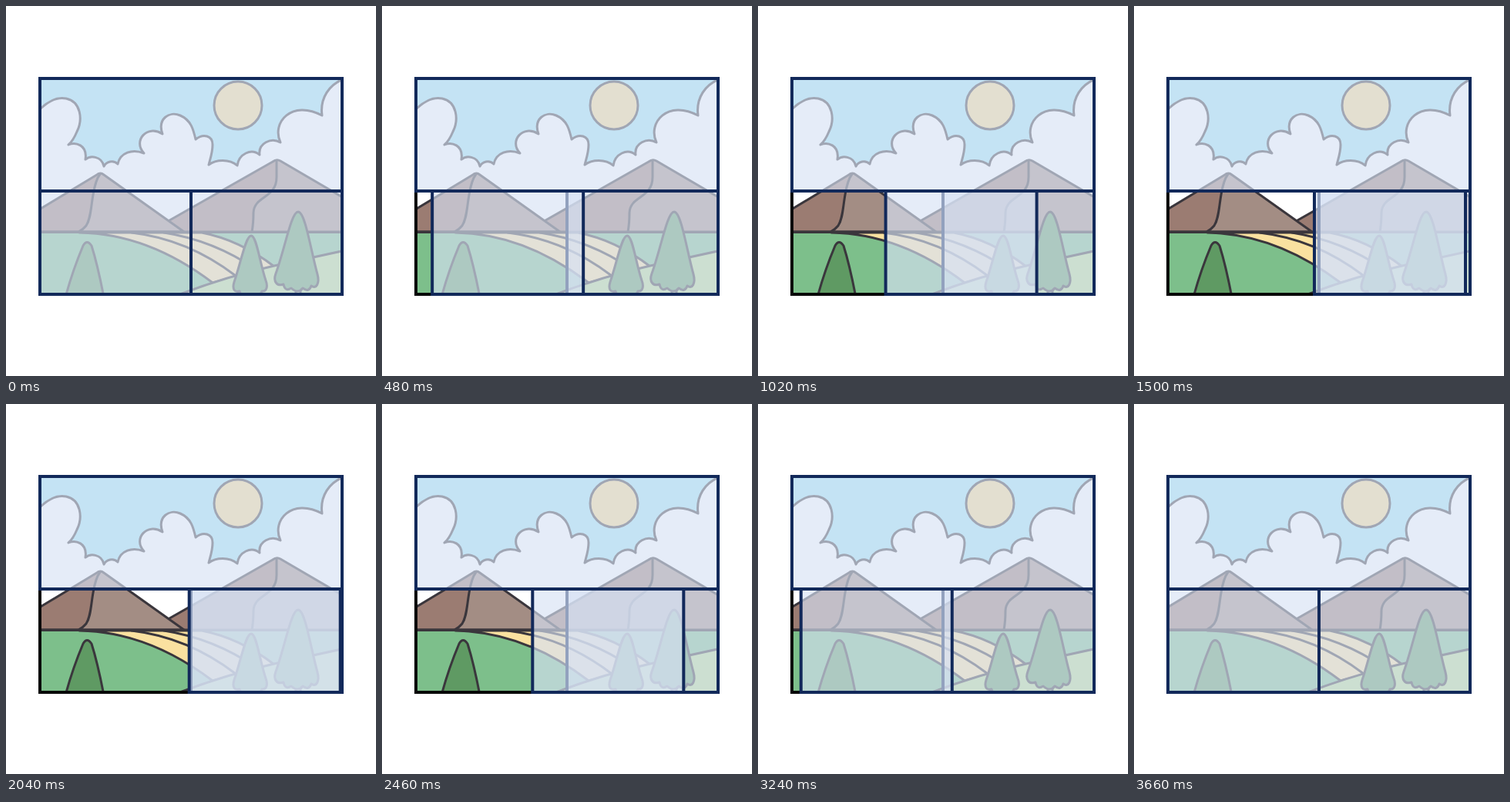
These frames come from a looping animation (480x480 px, 3.72 s). An HTML page:

```html
<!DOCTYPE html>
<html lang="en">
<head>
<meta charset="utf-8">
<title>Sliding window</title>
<style>
html, body { margin: 0; width: 100%; height: 100%; overflow: hidden; background: #fff; }
svg { display: block; width: 100vw; height: 100vh; }
.scene { stroke: #3a363c; stroke-width: 3; stroke-linejoin: round; stroke-linecap: round; }
.line { fill: none; }
.pane { fill: rgba(216, 226, 245, .65); stroke: #12295a; stroke-width: 4; }
.tree { fill: #5f9a63; }
</style>
</head>
<body>
<svg viewBox="0 0 480 480">
  <defs>
    <clipPath id="view"><rect x="44" y="94" width="392" height="280"/></clipPath>
    <clipPath id="leftPeak"><path id="peakA" d="M30 272L117 219.5Q122 215 127 219L231 293H30Z"/></clipPath>
    <clipPath id="rightPeak"><path id="peakB" d="M184 294L346 202Q351 198 356 201L450 256V294Z"/></clipPath>
  </defs>

  <g class="scene" clip-path="url(#view)">
    <rect x="40" y="90" width="400" height="290" fill="#a0e6f4"/>
    <circle cx="301" cy="129" r="31" fill="#fbdc8c"/>
    <path fill="#fff" d="M40 138C52 125 64 117 78 120C97 124 100 147 92 163Q87 175 81 180
      C90 176 106 180 103 199C109 194 124 194 127 208C130 202 139 199 145 205
      C148 190 164 185 179 191C164 175 183 153 203 166C196 146 212 136 226 142
      C240 148 243 160 246 173C256 165 268 168 268 180C268 190 265 198 263 206
      C272 199 290 198 300 207C302 192 318 184 329 193C327 178 344 170 356 177
      C344 151 371 121 410 142C407 120 419 101 440 94V300H40Z"/>

    <g clip-path="url(#rightPeak)" stroke="none">
      <rect x="180" y="190" width="270" height="110" fill="#a38d84"/>
      <path fill="#9b7c72" d="M180 300V190H351V226C349 250 322 244 320 268V300Z"/>
    </g>
    <path class="line" d="M351 201V222C351 250 322 246 321 268Q321 282 319 293"/>
    <use href="#peakB" class="line"/>

    <g clip-path="url(#leftPeak)" stroke="none">
      <rect x="30" y="210" width="210" height="90" fill="#a38d84"/>
      <path fill="#9b7c72" d="M30 300V210H122V218Q116 226 113 245C110 262 110 276 104 285Q100 290 94 293V300Z"/>
    </g>
    <path class="line" d="M122 218Q116 226 113 245C110 262 110 276 104 285Q100 290 94 293"/>
    <use href="#peakA" class="line"/>

    <rect x="38" y="293" width="404" height="90" fill="#7dbf8b"/>
    <path fill="#fae1a0" d="M95 294C165 295 222 324 268 359L348 338C322 318 290 301 254 294Z"/>
    <path class="line" d="M163 294C214 300 260 321 298 350M205 294C250 301 290 318 325 342M38 293.5H442"/>
    <path fill="#b8dc91" d="M220 376C262 360 303 347 348 337L440 317V380H220Z"/>

    <path class="tree" d="M77 378C84 352 92 330 100 311Q105 302 111 311C117 330 122 352 127 378Z"/>
    <path class="tree" d="M318 298C311 298 305 332 296 358C293 368 297 372 303 370
      Q305 378 312 374Q318 380 324 374Q330 376 332 370C338 371 340 364 337 356C329 332 325 298 318 298Z"/>
    <path class="line" d="M376 366V380M382 366V380"/>
    <path class="tree" d="M379 267C370 267 362 314 350 347C346 358 352 364 360 361
      Q362 371 370 366Q379 374 385 366Q393 372 396 363C403 368 407 359 404 348C395 315 388 267 379 267Z"/>
  </g>

  <rect x="44" y="94" width="392" height="280" fill="none" stroke="#080808" stroke-width="4"/>
  <rect class="pane" x="240" y="240" width="196" height="134"/>
  <rect class="pane" id="slider" x="44" y="240" width="196" height="134"/>
  <rect class="pane" x="44" y="94" width="392" height="146"/>
</svg>
<script>
const LOOP = 3720, GLIDE = 1470, OPEN_AT = 166, CLOSE_AT = 2004, TRAVEL = 194;
const slider = document.getElementById('slider');

// Sine ease from 0 to 1, held at both ends
function ease(t, start) {
  const p = Math.min(1, Math.max(0, (t - start) / GLIDE));
  return (1 - Math.cos(Math.PI * p)) / 2;
}

function draw(t) {
  const open = ease(t, OPEN_AT) - ease(t, CLOSE_AT);
  slider.setAttribute('x', (44 + TRAVEL * open).toFixed(2));
}

const begin = performance.now();
function tick() {
  draw((performance.now() - begin) % LOOP);
  requestAnimationFrame(tick);
}
draw(0);
requestAnimationFrame(tick);
</script>
</body>
</html>
```
